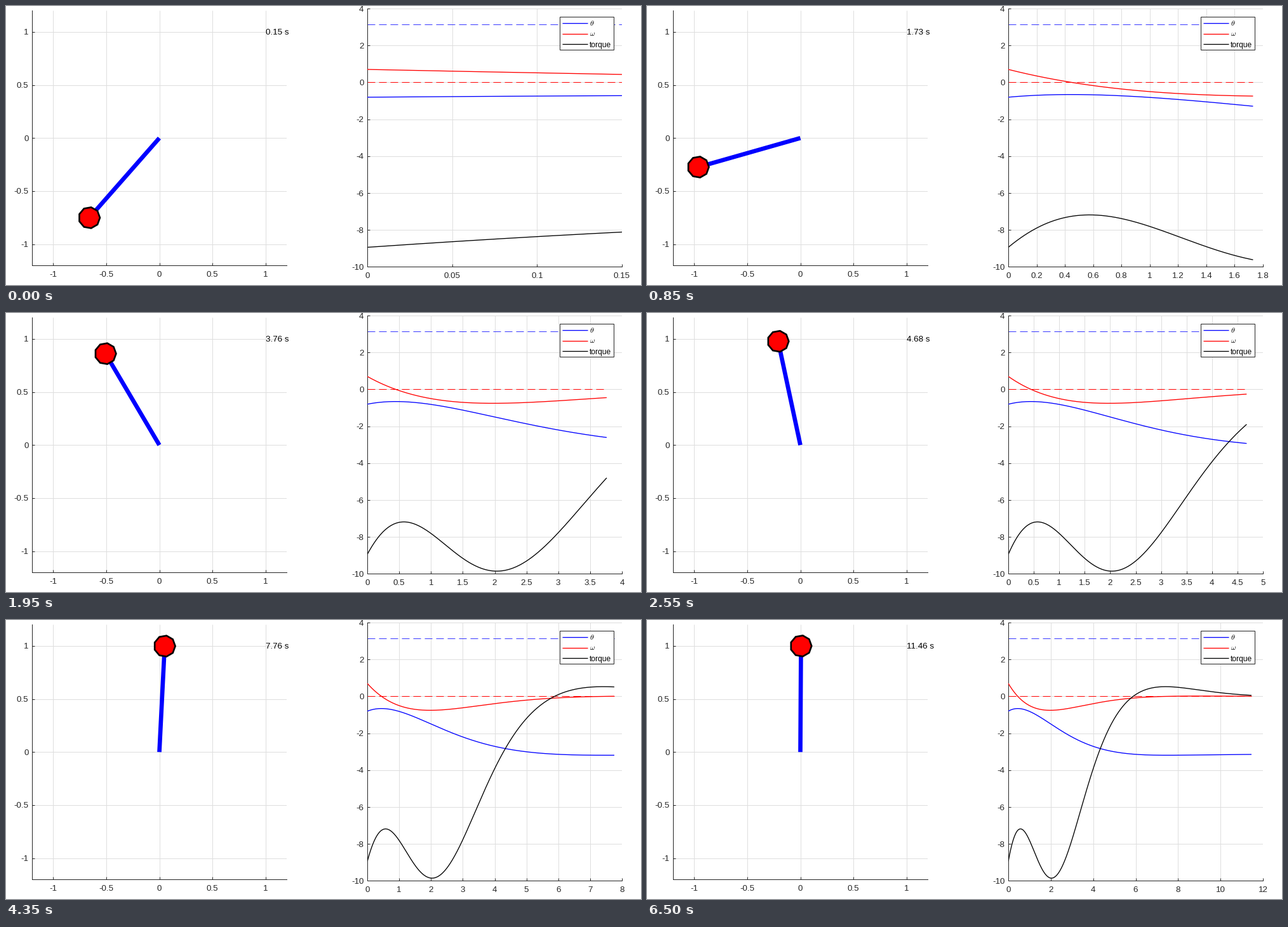
Animation, 1000 px wide and 440 px high, one loop 6.55 s. Source, as a matplotlib script:

```python
import numpy as np
import matplotlib.pyplot as plt
from matplotlib.animation import FuncAnimation
from matplotlib.patches import Polygon, Rectangle

W, H = 1000, 440
PX = 0.72                      # points per pixel at 100 dpi
INK = (0.15, 0.15, 0.15)
FRAMES, STEP_MS = 131, 50

plt.rcParams.update({
    "font.family": "Liberation Sans",
    "mathtext.fontset": "cm",
    "axes.unicode_minus": False,
    "lines.dash_capstyle": "butt",
    "lines.solid_capstyle": "butt",
})

# Pendulum driven to the upright position by a linearising controller
G, DAMP, K1, K2 = 9.81, 0.1, 0.5, 1.0
TH0, OM0 = -0.805, 0.7
SIG = (K2 + DAMP) / 2
WD = np.sqrt(K1 - SIG ** 2)
A = TH0 + np.pi
B = (OM0 + SIG * A) / WD


def motion(t):
    decay = np.exp(-SIG * t)
    c, s = np.cos(WD * t), np.sin(WD * t)
    err = decay * (A * c + B * s)
    omega = decay * ((B * WD - SIG * A) * c - (A * WD + SIG * B) * s)
    theta = err - np.pi
    torque = G * np.sin(theta) - K1 * err - K2 * omega
    return theta, omega, torque


# The clock advances unevenly and rests on a few steps
HOLDS = np.array([10, 26, 42, 50, 60, 74, 82, 98, 106, 120])
KNOTS = np.array([0, 11, 24, 39, 66, 87, 130])
CLOCK = [0.15, 1.13, 2.42, 3.76, 5.97, 7.76, 11.46]


def ticks_done(i):
    return i - np.sum(HOLDS <= i)


def clock(i):
    knots = [ticks_done(k) for k in KNOTS]
    return round(float(np.interp(ticks_done(i), knots, CLOCK)), 2)


def time_axis(t):
    for step in (0.05, 0.1, 0.2, 0.5, 1, 2):
        n = int(np.ceil(t / step - 1e-9))
        if n <= 10:
            break
    return step * np.arange(n + 1)


def number(v):
    return f"{round(float(v), 6) + 0.0:g}"


def make_axes(x0, x1, top, bottom):
    ax = fig.add_axes([x0 / W, 1 - bottom / H, (x1 - x0) / W, (bottom - top) / H])
    ax.patch.set_visible(False)
    ax.set_axisbelow(True)
    ax.grid(True, color="#dedede", lw=PX)
    for side, spine in ax.spines.items():
        spine.set_visible(side in ("left", "bottom"))
        spine.set_color(INK)
        spine.set_linewidth(PX)
    ax.tick_params(direction="in", length=4 * PX, width=PX, color=INK,
                   labelcolor=INK, labelsize=13.33 * PX)
    ax.tick_params(axis="x", pad=6.2)
    ax.tick_params(axis="y", pad=4)
    return ax


def set_ticks(axis, values):
    axis.set_ticks(values, [number(v) for v in values])


fig = plt.figure(figsize=(W / 100, H / 100), dpi=100, facecolor="white")

# Pendulum view
view = make_axes(41, 442, 7.5, 409)
view.set_xlim(-1.2, 1.2)
view.set_ylim(-1.2, 1.2)
for axis in (view.xaxis, view.yaxis):
    set_ticks(axis, np.arange(-1, 1.1, 0.5))
rod, = view.plot([], [], color="blue", lw=6.67 * PX, zorder=3)
ANGLES = np.linspace(0, 2 * np.pi, 10)[:-1]
RIM = 0.1 * np.column_stack([np.cos(ANGLES), np.sin(ANGLES)])
bob = Polygon(RIM, closed=True, fc="red", ec="black", lw=2.67 * PX,
              joinstyle="miter", zorder=4)
view.add_patch(bob)
label = view.text(1, 1, "", fontsize=13.33 * PX, va="center_baseline",
                  ha="left", color="black", zorder=5)

# Time histories
chart = make_axes(569, 970, 4, 411.4)
chart.set_ylim(-10, 4)
set_ticks(chart.yaxis, np.arange(-10, 5, 2))
COLORS = ("blue", "red", "black")
curves = [chart.plot([], [], color=c, lw=1.33 * PX, zorder=3)[0] for c in COLORS]
goals = [chart.plot([], [], color=c, lw=PX, zorder=2.5, dashes=(12, 6))[0]
         for c in ("#3838ff", "red")]

# Legend, laid out in pixels
top = fig.add_axes([0, 0, 1, 1])
top.set_xlim(0, W)
top.set_ylim(H, 0)
top.axis("off")
top.add_patch(Rectangle((871.9, 17.4), 85, 52, fc="white", ec=INK, lw=PX))
for y, color, name in zip((27.4, 43.8, 60.2), COLORS,
                          (r"$\theta$", r"$\omega$", "torque")):
    top.plot([876, 916], [y, y], color=color, lw=1.33 * PX)
    top.text(919, y + 0.5, name, fontsize=12 * PX, color="black",
             va="center_baseline" if name == "torque" else "center")


def draw(i):
    t = clock(i)
    theta = motion(t)[0]
    tip = np.array([np.sin(theta), -np.cos(theta)])
    rod.set_data([0, tip[0]], [0, tip[1]])
    bob.set_xy(RIM + tip)
    label.set_text(f"{t:.2f} s")

    ts = np.linspace(0, t, 400)
    for curve, values in zip(curves, motion(ts)):
        curve.set_data(ts, values)
    for goal, level in zip(goals, (np.pi, 0)):
        goal.set_data([0, t], [level, level])
    ticks = time_axis(t)
    set_ticks(chart.xaxis, ticks)
    chart.set_xlim(0, ticks[-1])
    return [rod, bob, label, *curves, *goals]


anim = FuncAnimation(fig, draw, frames=FRAMES, interval=STEP_MS,
                     init_func=lambda: draw(0), repeat=True, repeat_delay=0,
                     blit=False)
plt.show()
```
